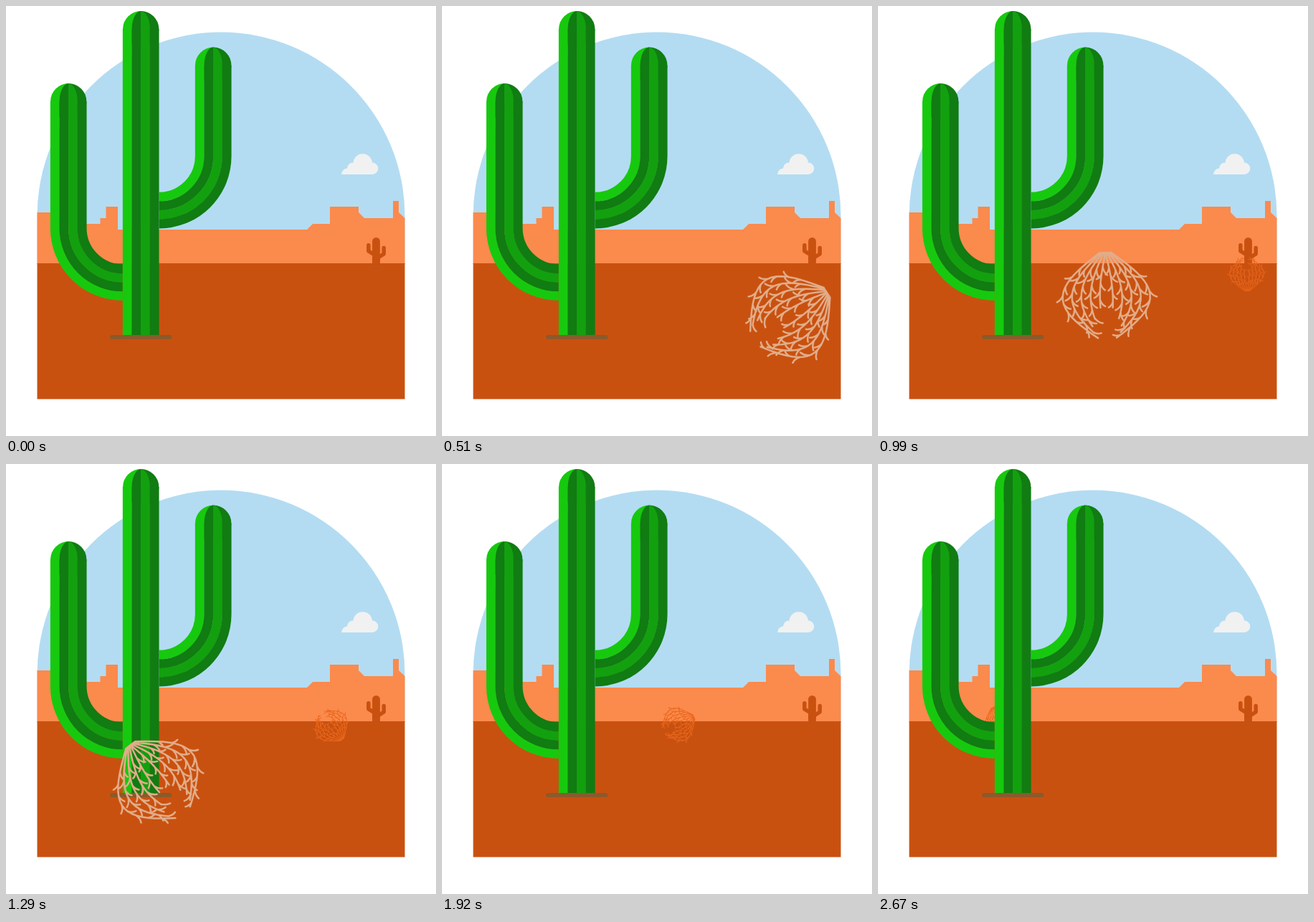
Animation, 600 px wide and 600 px high, one loop 2700 ms. Source, as an HTML page:

```html
<!DOCTYPE html>
<html lang="en">
<head>
<meta charset="utf-8">
<title>Desert</title>
<style>
  html, body { margin: 0; width: 100%; height: 100%; overflow: hidden; background: #fff; }
  svg { display: block; width: 100vw; height: 100vh; }
</style>
</head>
<body>
<svg viewBox="0 0 600 600">
  <defs>
    <clipPath id="frame"><path d="M43.5 548V293a256.5 256.5 0 0 1 513 0V548z"/></clipPath>
    <path id="weed" fill="none" stroke-width="2.5" stroke-linecap="round" stroke-linejoin="round"/>
  </defs>

  <path fill="#b3dcf2" d="M43.5 360V293a256.5 256.5 0 0 1 513 0V360z"/>
  <path fill="#fb8a4d" d="M43.5 360V288H88V304H131.5V296H139.5V280H156V312H420L428 304H452V280H492V288L500 296H540V272H548V288L556.5 296V360z"/>
  <path fill="#c95110" d="M43.5 359H556.5V548.5H43.5z"/>
  <path fill="#f1f1f1" d="M468 235q1-8 8-8.500q1-8 8.500-8a13.300 13.300 0 0 1 26.500 0a8.200 8.200 0 0 1 0 16.500z"/>
  <g fill="none" stroke="#c95110" stroke-linecap="round" stroke-linejoin="round" stroke-width="5.500">
    <path stroke-width="10.800" d="M516.500 328.400V354"/>
    <path d="M505.800 333.700V342L515 347.500M527.200 337.500V346L517 352.500"/>
    <path stroke-linecap="butt" stroke-width="10.800" d="M516.500 350V360"/>
  </g>

  <g clip-path="url(#frame)"><use id="small" href="#weed" stroke="#ea671b"/></g>
  <path stroke="#8b5a2b" stroke-width="6" stroke-linecap="round" d="M148 462H228.500"/>
  <g id="cactus" fill="none" stroke-width="12.900"></g>
  <g clip-path="url(#frame)"><use id="big" href="#weed" stroke="#e2ac88"/></g>
</svg>
<script>
const LOOP = 2700, STEP = 30;
const $ = id => document.getElementById(id);

// Cactus: each limb is four stripes, a domed top and an optional quarter bend.
const LIGHT = '#17c90e', DARK = '#107c12', MID = '#13a00f';
const STRIPES = [LIGHT, DARK, MID, DARK];
const Q = 12.6, R = 2 * Q;

function limb(cx, top, bottom, bend) {
  const y = top + R;
  const half = (rx, sweep, color) =>
    `<path stroke="none" fill="${color}" d="M${cx} ${top}A${rx} ${R} 0 0 ${sweep} ${cx} ${top + 2 * R}z"/>`;
  const dome = half(R, 0, LIGHT) + half(R, 1, DARK) + half(Q, 0, DARK) + half(Q, 1, MID);
  const body = STRIPES.map((color, i) => {
    const off = (i - 1.5) * Q;
    const r = 6 * Q + bend * off;
    const arc = bend ? `A${r} ${r} 0 0 ${bend > 0 ? 1 : 0} ${cx - bend * 6 * Q} ${bottom + r}` : '';
    return `<path stroke="${color}" d="M${cx + off} ${y}V${bottom}${arc}"/>`;
  });
  return dome + body.join('');
}

$('cactus').innerHTML =
  limb(87.2, 108, 310, -1) + limb(289.2, 57.5, 209.5, 1) + limb(188.2, 7, 459, 0);

// Tumbleweed: meridians fanning out from the stem, with twigs on both sides.
let seed = 7;
const rnd = () => (seed = seed * 16807 % 2147483647) / 2147483647;

function weedPath() {
  const branches = [[9, .6], [21, .72], [33, .8], [45, .87], [57, .93]];
  let d = '';
  for (const s of [-1, 1]) {
    branches.forEach(([w, end], i) => {
      const at = v => [
        s * (w * Math.sin(Math.PI * v) + 2 * i * (1 - v)),
        -64 + 128 * v
      ];
      const pt = p => p.map(n => n.toFixed(1)).join(' ');
      const line = [];
      for (let k = 0; k <= 20; k++) line.push(pt(at(end * k / 20)));
      d += 'M' + line.join('L');
      let side = s;
      for (let v = .15 + .04 * rnd(); v < end; v += .075 + .03 * rnd()) {
        const [x, y] = at(v), [nx, ny] = at(v + .01);
        const a = Math.atan2(ny - y, nx - x), b = a + side * .65;
        const len = 9 + 5 * rnd();
        const tip = [x + len * Math.cos(b), y + len * Math.sin(b)];
        const mid = [x + len * .6 * Math.cos(a + side * .3), y + len * .6 * Math.sin(a + side * .3)];
        d += `M${pt([x, y])}Q${pt(mid)} ${pt(tip)}`;
        side = -side;
      }
    });
  }
  return d;
}
$('weed').setAttribute('d', weedPath());

const BIG_X = [[0, 660], [120, 616], [510, 475], [990, 319], [1290, 219], [1530, 136], [1920, -11], [2700, -310]];
const SMALL_X = [[0, 720], [660, 582], [990, 514.5], [1290, 453.5], [1530, 405], [1920, 329], [2310, 252], [2700, 165]];

function track(keys, t) {
  const i = keys.findIndex(k => k[0] > t);
  const [t0, x0] = keys[i - 1], [t1, x1] = keys[i];
  return x0 + (x1 - x0) * (t - t0) / (t1 - t0);
}
const bounce = (t, low, period, mean, amp) =>
  mean + amp * Math.cos(2 * Math.PI * (t - low) / period);

function place(id, x, y, angle, scale, lift) {
  $(id).setAttribute('transform',
    `translate(${x} ${y}) rotate(${angle}) scale(${scale}) translate(0 ${-lift})`);
}

function draw(now) {
  const t = Math.floor(now % LOOP / STEP) * STEP;
  place('big', track(BIG_X, t), bounce(t, 1239, 408, 435, 22), 57 + (510 - t) * .1215, 1, 10);
  place('small', track(SMALL_X, t), bounce(t, 1087, 612, 368.5, 7.5), 65 + (1920 - t) * .1215, .39, 0);
}

const start = performance.now();
function tick() {
  draw(performance.now() - start);
  requestAnimationFrame(tick);
}
tick();
</script>
</body>
</html>
```
